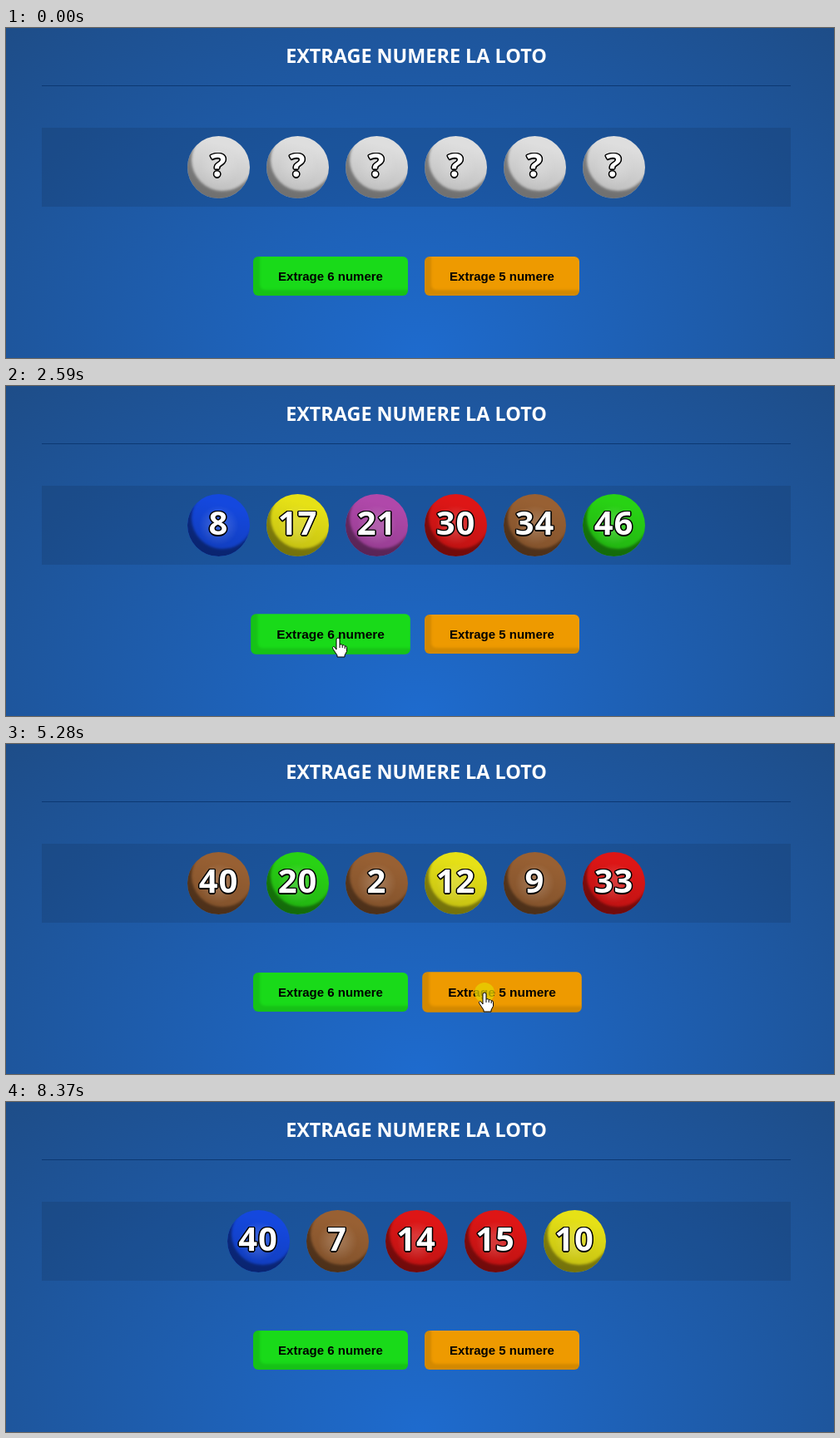
Animation, 995 px wide and 397 px high, one loop 9020 ms. Source, as an HTML page:

```html
<!DOCTYPE html>
<html lang="ro">
<head>
<meta charset="utf-8">
<title>Extrage numere</title>
<style>
html, body { margin: 0; width: 100%; height: 100%; overflow: hidden; }
body {
  position: relative;
  background: radial-gradient(ellipse at bottom, #1e6bce, #1e4d88);
}
body > * { position: absolute; }
h1 {
  left: 43px; top: 17px; width: 900px; margin: 0; padding-bottom: 19px;
  border-bottom: 1px solid #0c3872;
  font: 700 23.4px/33px "Open Sans", "Noto Sans", sans-serif;
  color: #fff; text-align: center;
}
#row {
  left: 43px; top: 120px; width: 900px; height: 95px;
  display: flex; justify-content: center; align-items: center; gap: 20px;
  background: rgba(0, 0, 0, .1);
}
.ball {
  width: 75px; height: 75px; border-radius: 50%;
  background: radial-gradient(circle, rgba(255,255,255,.15) 15%, transparent 45%),
    linear-gradient(195deg, transparent 20%, rgba(0,0,0,.18)) var(--c);
  box-shadow: inset 5px -9px 3px rgba(0, 0, 0, .4);
  font: 700 40px/67px "Open Sans", "Noto Sans", sans-serif;
  letter-spacing: 1px; text-align: center; color: #fff;
  text-shadow: -1px -1px #000, 1px -1px #000, -1px 1px #000, 1px 1px #000,
    -1.5px 0 #000, 1.5px 0 #000, 0 -1.5px #000, 0 1.5px #000;
}
.btn {
  top: 275px; width: 186px; height: 47px; border-radius: 6px;
  font: 700 15px/47px "Liberation Sans", Arial, sans-serif;
  text-align: center; white-space: nowrap; color: #000;
  box-shadow: inset 8px -7px 3px rgba(0, 0, 0, .11);
}
.btn.hover { transform: scale(1.03); }
svg { left: 0; top: 0; width: 995px; height: 397px; }
</style>
</head>
<body>
<h1>EXTRAGE NUMERE LA LOTO</h1>
<div id="row"></div>
<div class="btn" style="left:297px;background:#19da19">Extrage 6 numere</div>
<div class="btn" style="left:503px;background:#ee9a00">Extrage 5 numere</div>
<svg viewBox="0 0 995 397">
  <g id="cursor" stroke="#000" stroke-linejoin="round">
    <circle id="click" r="12" fill="#e6d200" fill-opacity=".75" stroke="none"/>
    <path id="arrow" fill="#fff" d="M0 0v17l4-4 2.7 6 2.5-1-2.7-6h5.5z"/>
    <g id="hand">
      <path fill="#fff" d="M-2 14V2q0-2 2-2t2 2v6q2.5-1 3.2.8 2.3-.8 3 1 2.3-.4 2.3 2v4.5L8 21v2H-1v-2L-6 13.5q-1.5-2.5.5-3 1.5 0 3.5 3.5z"/>
      <path fill="none" d="M2 8v4M5.2 9v3M8.2 10v3"/>
    </g>
  </g>
</svg>
<script>
const LOOP = 9020, STEP = 70, ENTER = 460, LEAVE = 8370;
const colors = {
  w: '#dedede', g: '#28d214', r: '#de1616', n: '#986033',
  p: '#b048aa', b: '#1448de', y: '#e6e116'
};

// Each draw: time clicked, time shown, then number and colour letter per ball
const draws = [
  [0, 0, '?w ?w ?w ?w ?w ?w'],
  [1790, 1860, '13g 14r 26n 33p 43g 49y'],
  [2520, 2590, '8b 17y 21p 30r 34n 46g'],
  [3120, 3190, '22b 42b 13g 43b 39r 22b'],
  [3990, 4060, '48r 44y 36r 1p 45b 5r'],
  [4460, 4530, '40n 20g 2n 12y 9n 33r'],
  [5280, 5350, '11g 38b 24r 3y 29p'],
  [6010, 6080, '45n 27y 16n 6p 37y'],
  [6810, 6940, '40b 7n 14r 15r 10y']
];

// Pointer path: time, x, y
const path = [
  [460, 822, 370], [600, 760, 362], [870, 560, 338], [1080, 380, 306],
  [1160, 355, 301], [1300, 401, 295], [1520, 399, 303], [3990, 399, 303],
  [4060, 401, 304], [4530, 401, 304], [4740, 500, 303], [4950, 575, 299],
  [7810, 575, 299], [7940, 610, 308], [8120, 780, 345], [8300, 942, 388]
];

const $ = id => document.getElementById(id);
const buttons = [...document.querySelectorAll('.btn')];
const show = (id, on) => $(id).style.display = on ? '' : 'none';
let shown;

function pointerAt(t) {
  t = ENTER + Math.floor((t - ENTER) / STEP) * STEP;
  const i = path.findIndex(p => p[0] > t);
  if (i < 0) return path[path.length - 1].slice(1);
  if (i === 0) return path[0].slice(1);
  const a = path[i - 1], b = path[i], k = (t - a[0]) / (b[0] - a[0]);
  return [1, 2].map(j => a[j] + (b[j] - a[j]) * k);
}

function drawBalls(t) {
  const list = draws.filter(d => d[1] <= t).pop()[2];
  if (list === shown) return;
  shown = list;
  $('row').innerHTML = list.split(' ').map(s =>
    `<div class="ball" style="--c:${colors[s.slice(-1)]}">${s.slice(0, -1)}</div>`).join('');
}

function frame(now) {
  const t = now % LOOP, visible = t >= ENTER && t < LEAVE;
  const [x, y] = pointerAt(t);
  let over = false;
  for (const b of buttons) {
    const dx = x - b.offsetLeft, dy = y - b.offsetTop;
    const hit = visible && dx >= 0 && dx <= 186 && dy >= 0 && dy <= 47;
    b.classList.toggle('hover', hit);
    over = over || hit;
  }
  drawBalls(t);
  show('cursor', visible);
  show('hand', over);
  show('arrow', !over);
  show('click', draws.some(([from, to]) => t >= from && t < to));
  $('cursor').setAttribute('transform', `translate(${x} ${y})`);
  requestAnimationFrame(frame);
}
requestAnimationFrame(frame);
</script>
</body>
</html>
```
